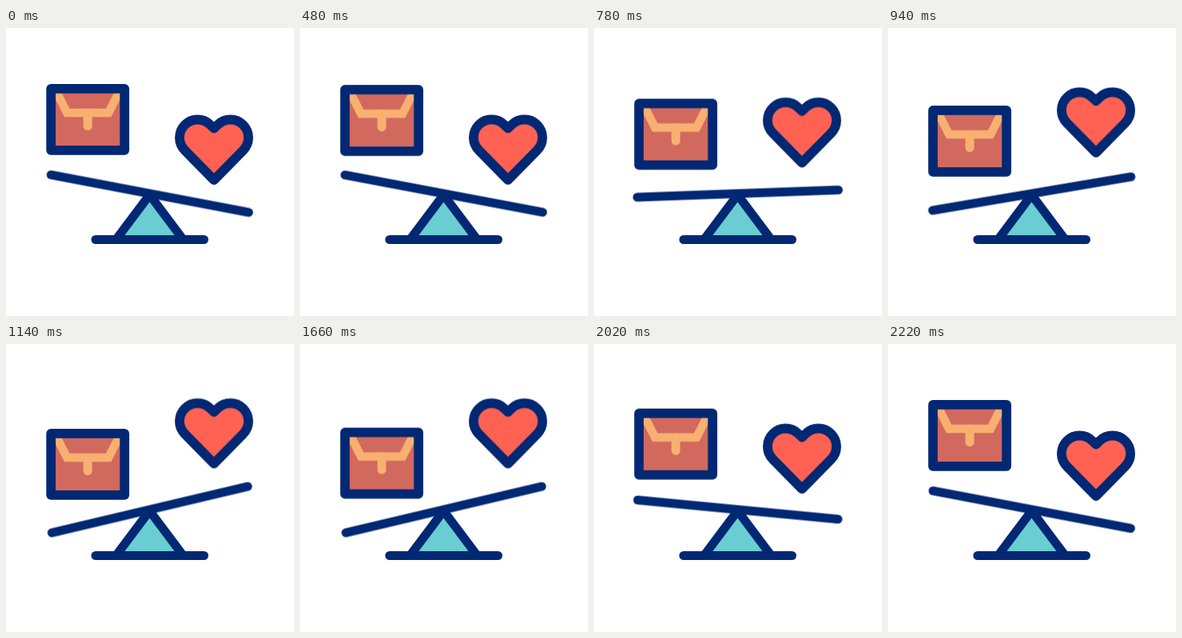
An HTML page for the animation above (2720 ms loop, 360 by 360 pixels).

```html
<!DOCTYPE html>
<html lang="en">
<head>
<meta charset="utf-8">
<title>Work and love balance</title>
<style>
  html, body { margin: 0; width: 100%; height: 100%; overflow: hidden; background: #fff; }
  svg { display: block; width: 100vw; height: 100vh; }

  .line { stroke: #022873; stroke-width: 11; stroke-linecap: round; stroke-linejoin: round; }
  .bold { stroke-width: 11.8; }

  .case, .heart, .plank {
    animation: 2720ms infinite;
    animation-timing-function: var(--ease);
  }
  .heart, .plank { --ease: cubic-bezier(.3, 0, .57, 1); }
  .case { --ease: cubic-bezier(.333, .352, .667, .76); animation-name: case; }
  .heart { animation-name: heart; }
  .plank { animation-name: plank; transform-origin: 179.75px 207px; }

  @keyframes case {
    0%, 16.912%, 81.618%, 100% { transform: translateY(0); }
    41.912%, 60.294% { transform: translateY(36px); }
  }
  @keyframes heart {
    0%, 16.912%, 81.618%, 100% { transform: translateY(0); }
    41.912%, 60.846% { transform: translateY(-40.5px); }
  }
  @keyframes plank {
    0%, 16.912%, 81.618%, 100% { transform: rotate(10.75deg); }
    41.912%, 60.846% { transform: rotate(-13.3deg); }
  }
</style>
</head>
<body>
<svg viewBox="0 0 360 360" fill="none">
  <defs>
    <clipPath id="inside"><rect x="56" y="76" width="92.5" height="77"/></clipPath>
  </defs>

  <path class="line" fill="#69cdd1" d="M179.5 208.5 L137.5 264.5 H221.5 Z"/>
  <path class="line" d="M112 264.5 H247.5"/>
  <path class="line plank" d="M54 207 H305.5"/>

  <g class="case">
    <rect x="56" y="76" width="92.5" height="77" fill="#d2695e"/>
    <g clip-path="url(#inside)" stroke="#f8b071" stroke-width="10.5">
      <path d="M60 74 L76.3 106 H128.2 L144.5 74"/>
      <path d="M102.2 106 V122.5" stroke-width="11" stroke-linecap="round"/>
    </g>
    <rect class="line bold" x="56.2" y="75.9" width="92" height="76.9"/>
  </g>

  <path class="line bold heart" fill="#ff6152"
    d="M260 190 L223.6 153 A22.5 22.5 0 1 1 255.4 121.1 L260 125.5 L264.6 121.1 A22.5 22.5 0 1 1 296.4 153 Z"/>
</svg>
</body>
</html>
```
